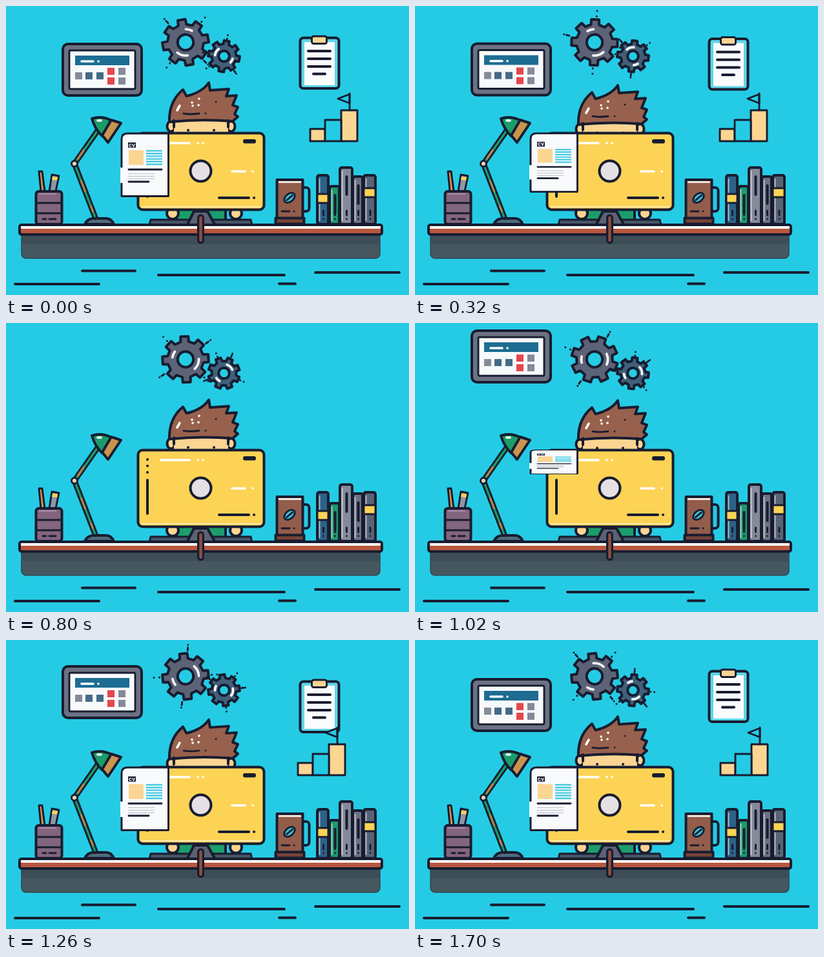
Write an HTML page that moves like this. It is 624 by 449 pixels and loops after 1740 ms.

```html
<!DOCTYPE html>
<html lang="en">
<head>
<meta charset="utf-8">
<title>Desk</title>
<style>
html, body { margin: 0; width: 100%; height: 100%; overflow: hidden; background: #25cbe4; }
svg { display: block; width: 100%; height: 100%; }
.o { stroke: #181c30; stroke-width: 4; stroke-linejoin: round; stroke-linecap: round; }
.thin { stroke-width: 2.9; }
.line { fill: none; }
.w { fill: none; stroke: #fff; stroke-width: 3.6; stroke-linecap: round; }
.skin { fill: #fbd592; }
.sky { fill: #25cbe4; }
.dark { fill: #181c30; }
</style>
</head>
<body>
<svg viewBox="0 0 624 449">
  <g id="tablet">
    <rect class="o" x="88" y="59" width="122" height="80" rx="8" fill="#6c7183"/>
    <rect class="o thin" x="98" y="69" width="102" height="60" rx="2" fill="#f7f9fb"/>
    <path fill="#1d6c92" d="M107 77h84v15h-84z"/>
    <path class="w" d="M117 86h18M143 86h.1"/>
    <path fill="#858a99" d="M107 103h11v11h-11zM174 96h11v11h-11zM174 111h11v11h-11z"/>
    <path fill="#446a87" d="M123 103h11v11h-11zM140 103h11v11h-11z"/>
    <path fill="#e5474d" d="M157 96h11v11h-11zM157 111h11v11h-11z"/>
  </g>
  <g id="clipboard">
    <rect class="o" x="455.500" y="49.500" width="60" height="78.500" rx="5" fill="#5fd6ea"/>
    <path fill="#fafbfc" d="M462 56h47v67h-47z"/>
    <rect class="o thin skin" x="473.500" y="47" width="23" height="11.500" rx="3"/>
    <path class="o line" d="M468 70h34M468 82h34M468 94h34M476 105.500h18"/>
  </g>
  <g id="chart" class="o thin">
    <path class="skin" d="M471 210v-19h23v19zM519 210v-48h25v48z"/>
    <path class="sky" d="M494 210v-33h25v33zM532 137l-18 7 18 7z"/>
    <path d="M532 162v-26"/>
  </g>

  <g id="bigGear"></g>
  <g id="smallGear"></g>

  <g id="head">
    <ellipse class="o skin" cx="255.500" cy="187" rx="6" ry="8"/>
    <ellipse class="o skin" cx="348.500" cy="187" rx="6" ry="8"/>
    <path class="skin" d="M260 172h84v34h-84z"/>
    <path class="o" fill="#98614d" d="M253 180Q252 148 274 130L279.500 140Q304 134 314 119L316 131 345 129 341 140 357 139 351 154 359 157 354 168 359 172 351 179Q302 175 253 180z"/>
    <path class="o line" d="M260 178v10M344 178v10"/>
    <path class="w" d="M265 162l4-7M288 150h.1M289 155h.1M298 154h.1M299 144h.1"/>
    <path class="o thin line" d="M275 167q10 2 24 0M309 167h.1M325 149h.1"/>
    <path class="o line" d="M282 193h.1M322 193h.1"/>
  </g>

  <path fill="#1b9e6c" class="o" d="M264 315h76v22h-76z"/>
  <g class="o skin"><circle cx="258" cy="322" r="9"/><circle cx="356" cy="322" r="9"/></g>
  <path class="o thin" fill="#465568" d="M224 332h155l2 8H222z"/>

  <rect class="o" x="204.500" y="197.500" width="195" height="119" rx="7" fill="#fdd356"/>
  <path stroke="#fdebb0" stroke-width="2" d="M210 312h184"/>
  <circle class="o" cx="301.500" cy="256.500" r="16" fill="#e6dfe4"/>
  <rect class="dark" x="367" y="207" width="20" height="6.500" rx="3"/>
  <path class="w" d="M240 213h44M297 213h.1M305 213h.1M350 257h20M382 257h.1"/>
  <path class="o line" d="M330 298h46M384 298h.1M219 244v52M219 212h.1M219 222h.1M219 232h.1"/>

  <g id="paper">
    <path class="o thin" fill="#f9fafc" d="M179 295.500V207Q179 198 188 198H251.500V295.500z"/>
    <path stroke="#f9fafc" stroke-width="4" d="M179 251v24"/>
    <path class="dark" d="M189 212h12v8h-12z"/>
    <text x="195" y="218.500" font-family="Inter, sans-serif" font-weight="800" font-size="6.500" fill="#fff" text-anchor="middle">CV</text>
    <path fill="#fbd592" d="M190 224h23v23h-23z"/>
    <path stroke="#44cbe0" stroke-width="2.400" d="M217 225h25m-25 4.200h25m-25 4.200h25m-25 4.200h25m-25 4.200h25m-25 4.200h25"/>
    <path class="o thin" d="M190 254h51M190 273h31"/>
    <path stroke="#b9bcc6" d="M189 260.500h41m-41 4h41m-41 4h41"/>
  </g>

  <path class="o" fill="#5b6274" d="M291 319h21l12 22h-44z"/>

  <g id="lamp">
    <path class="o" fill="#4e6c7d" d="M122 339q4-9 14-9h19q8 0 12 9z"/>
    <path class="o line" style="stroke-width:9" d="M138 328L106 245 143 192"/>
    <path fill="none" stroke="#1b9c6b" stroke-width="3.200" d="M138 328L106 245 143 192"/>
    <path fill="none" stroke="#b08349" stroke-width="3.200" d="M116 271l7 18M131 310l4 10M111 238l10-15"/>
    <circle class="o thin" cx="106" cy="245" r="4.500" fill="#efd3b0"/>
    <path class="o" fill="#1b9c6b" d="M133 175Q148 170 164 178L149 202Q138 192 133 175z"/>
    <path class="o" fill="#c89450" d="M163 177l15 5-20 30-9-11z"/>
    <path class="w" d="M142 178h5"/>
  </g>

  <g id="pens">
    <path class="o thin" fill="#d9934c" d="M51 257h5l4 31h-6z"/>
    <path class="o thin" fill="#8f96a5" d="M71 262l11 2-5 24h-10z"/>
    <path fill="#fdd356" d="M72 265l8 1-1 5-8-1z"/>
    <rect class="o" x="46.500" y="288" width="40" height="51" rx="4" fill="#83657f"/>
    <path class="o thin line" d="M47 306h38M47 322h38M57 331h5M67 331h10"/>
    <path stroke="#a98bab" stroke-width="2" d="M51 292h27"/>
  </g>

  <g id="mug">
    <rect class="o" x="453" y="282" width="16.500" height="37" rx="5" fill="#25cbe4"/>
    <path class="o" fill="#935d4b" d="M419.500 270h40v60h-40z"/>
    <path stroke="#f3e6df" stroke-width="3" d="M422 273.500h35"/>
    <path class="o" fill="#774437" d="M417.500 329.500h44v9h-44z"/>
    <g transform="rotate(-40 439 298)" class="o thin">
      <ellipse cx="439" cy="298" rx="9.500" ry="6" fill="#38c5dc"/>
      <path d="M433 298h12"/>
    </g>
    <path class="o thin" d="M427 319h12M446 319h.1"/>
  </g>

  <g id="books"></g>

  <rect x="24" y="350" width="555" height="42" rx="7" fill="#46575f" stroke="#34444f" stroke-width="1.500"/>
  <path fill="#3d4d57" d="M25 356h553v14H25z"/>
  <rect class="o" x="21" y="340" width="561" height="15" rx="3" fill="#b9573e"/>
  <path stroke="#fff" stroke-width="4" d="M23 344h557"/>
  <path class="o line" style="stroke-width:11" d="M301.500 329v35"/>
  <path stroke="#8d4f41" stroke-width="4.500" stroke-linecap="round" d="M301.500 329v35"/>
  <path class="o line" d="M14 432h130M118 411.500h82M236 418h195M423 431.500h25M479 414h130"/>
</svg>
<script>
const LOOP = 1740;
const el = id => document.getElementById(id);

// A cog centred on 0,0, with two bright arcs and a few sparks outside it.
function gear(id, r, fill, shine, sparks) {
  const polar = (radius, deg) => {
    const a = deg * Math.PI / 180;
    return `${(radius * Math.cos(a)).toFixed(2)} ${(radius * Math.sin(a)).toFixed(2)}`;
  };
  const points = [];
  for (let a = 0; a < 360; a += 45) {
    points.push(polar(r * .78, a - 13), polar(r, a - 9.5), polar(r, a + 9.5), polar(r * .78, a + 13));
  }
  const rays = sparks.map((a, i) =>
    `M${polar(r * 1.12, a)}L${polar(r * (i % 2 ? 1.13 : 1.25), a)}M${polar(r * 1.36, a)}l.1 0`).join('');
  const radius = r * .57;
  const arc = (a, half) => `M${polar(radius, a - half)}A${radius} ${radius} 0 0 1 ${polar(radius, a + half)}`;
  el(id).innerHTML = `<polygon class="o" points="${points}" fill="${fill}"/>
    <circle class="o sky" r="${r * .34}"/>
    <path class="w" d="${arc(shine, 24)}${arc(shine + 180, 14)}"/>
    <path class="o thin line" d="${rays}"/>`;
}

// A spine with either a yellow band or a long printed line.
function book(x, y, width, fill, bandY) {
  const mid = x + width / 2;
  const title = bandY
    ? `<rect class="o thin" x="${x}" y="${bandY}" width="${width}" height="14" fill="#fdd356"/>`
    : `<path class="o" d="M${mid + 1} ${y + 14}v28"/>`;
  return `<rect class="o" x="${x}" y="${y}" width="${width}" height="${339 - y}" rx="3" fill="${fill}"/>
    <path stroke="#fff" stroke-opacity=".55" stroke-width="2" d="M${x + 3.5} ${y + 5}V334"/>
    ${title}<path class="o thin" d="M${mid + 1} 318v7M${mid + 1} 331v.1"/>`;
}

// Smooth value at time t through [time, value] pairs.
function track(t, keys) {
  if (t <= keys[0][0]) return keys[0][1];
  for (let i = 1; i < keys.length; i++) {
    const [t0, v0] = keys[i - 1], [t1, v1] = keys[i];
    if (t < t1) {
      const p = (t - t0) / (t1 - t0);
      return v0 + (v1 - v0) * p * p * (3 - 2 * p);
    }
  }
  return keys[keys.length - 1][1];
}

gear('bigGear', 36, '#5d6377', 115, [55, 137, 238, 318]);
gear('smallGear', 24.5, '#41607a', 200, [45, 135, 180, 270]);
el('books').innerHTML =
  book(482, 263, 17, '#2d6288', 292) +
  book(501, 280, 15, '#1c9a6b') +
  book(537, 265, 15, '#6d7182') +
  book(517, 251, 19, '#858a99') +
  book(554, 263, 18, '#596377', 283);

const tabletY = [[930, -150], [1020, -47], [1130, 14], [1260, -18], [1390, 6], [1500, 2], [1700, 2], [1740, 0]];
const clipY = [[1060, -135], [1180, -10], [1260, 15], [1390, -9], [1500, -3], [1700, -1], [1740, 0]];
const chartX = [[1060, 160], [1180, 10], [1260, -19], [1390, 7], [1500, -3.5], [1700, 2], [1740, 0]];
const paperIn = [[930, 0], [1020, .38], [1180, 1]];
const paperOut = [[200, 1], [320, .93], [500, .7], [720, 0]];

function place(id, x, y, opacity) {
  el(id).setAttribute('transform', `translate(${x} ${y})`);
  el(id).setAttribute('opacity', opacity);
}

function draw(now) {
  const t = now % LOOP;
  const entering = t > 860;
  const shown = entering ? 1 : 1 - track(t, [[600, 0], [780, 1]]);
  const drift = track(t, [[0, 0], [320, 1]]);

  place('tablet', 0, entering ? track(t, tabletY) : -.5 * drift, shown);
  place('clipboard', 0, entering ? track(t, clipY) : 1.5 * drift, shown);
  place('chart', entering ? track(t, chartX) : drift, 0, shown);
  place('head', 0, 2.5 * (1 - Math.cos(t / LOOP * 4 * Math.PI)), 1);

  const fold = track(t, entering ? paperIn : paperOut);
  el('paper').setAttribute('transform', `translate(0 197) scale(1 ${fold}) translate(0 -197)`);
  el('paper').style.display = fold > .01 ? '' : 'none';

  const turn = t / LOOP;
  el('bigGear').setAttribute('transform', `translate(278 56.5) rotate(${-10 - 180 * turn})`);
  el('smallGear').setAttribute('transform', `translate(337.5 78) rotate(${10 + 225 * turn})`);
}

const start = performance.now();
function frame() {
  draw(performance.now() - start);
  requestAnimationFrame(frame);
}
frame();
</script>
</body>
</html>
```
